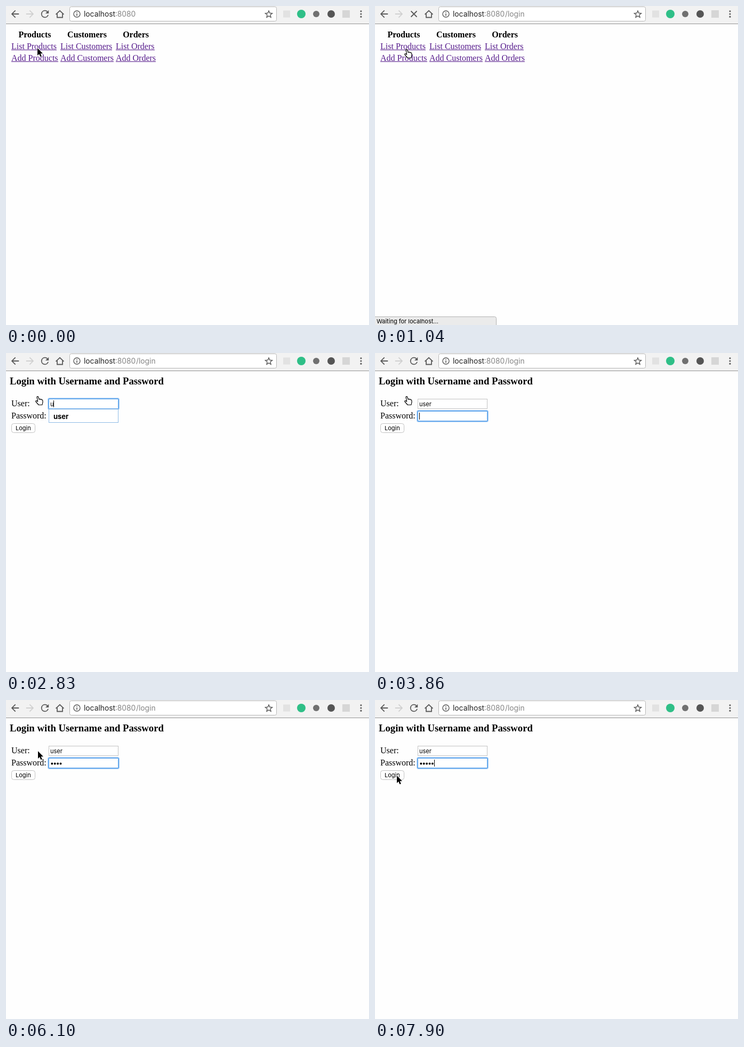
An HTML page for the animation above (8 s loop, 681 px wide and 599 px high).

```html
<!DOCTYPE html>
<html lang="en">
<head>
<meta charset="utf-8">
<title>Login demo</title>
<style>
  html, body { margin: 0; width: 100%; height: 100%; overflow: hidden; background: #fefefe; }
  svg { display: block; }
  .ui { font-family: Inter, sans-serif; font-size: 11px; }
  .url { font-size: 13.8px; }
  .page { font-family: "Liberation Serif", serif; font-size: 16px; }
  .th { font-weight: bold; text-anchor: middle; }
  .link { fill: #551a8b; }
  .icon { fill: #5a5a5a; }
  .line { fill: none; stroke: #5a5a5a; stroke-width: 1.8; }
</style>
</head>
<body>
<svg width="681" height="599" viewBox="0 0 681 599">
  <defs>
    <path id="arrow" d="M20 11H7.83l5.59-5.59L12 4l-8 8 8 8 1.41-1.41L7.83 13H20z"/>
  </defs>
  <rect width="681" height="599" fill="#fefefe"/>

  <g id="toolbar">
    <rect width="681" height="33" fill="#f2f2f2"/>
    <rect y="33" width="681" height="1" fill="#929292"/>
    <use href="#arrow" class="icon" transform="translate(6.2 4.2) scale(.9)"/>
    <use href="#arrow" fill="#d0d0d0" transform="translate(55.8 4.2) scale(-.9 .9)"/>
    <path id="reload" class="icon" transform="translate(62.2 4.2) scale(.9)" d="M17.65 6.35A7.96 7.96 0 0 0 12 4a8 8 0 1 0 7.73 10h-2.08A6 6 0 1 1 12 6c1.66 0 3.14.69 4.22 1.78L13 11h7V4z"/>
    <path id="stop" class="line" d="M67.5 9.5l11 11m0-11l-11 11"/>
    <path class="line" d="M93.5 15.8L101 8.8l7.500 7M96 14.500V21.500H106V14.500"/>
    <rect x="119.500" y="1.500" width="388" height="27" rx="3" fill="#fff" stroke="#b8b8b8"/>
    <circle cx="133" cy="15" r="6" class="line" style="stroke-width:1.4"/>
    <path class="icon" d="M132.200 11.500h1.600v1.600h-1.600zM132.200 14.200h1.600v4.300h-1.600z"/>
    <g class="ui url">
      <text x="146" y="20" fill="#222">localhost</text>
      <text x="204.800" y="20" fill="#858585">:8080</text>
      <text id="path" x="244" y="20" fill="#858585">/login</text>
    </g>
    <path class="line" style="stroke-width:1.400" d="M493 9l1.800 4.300 4.700.4-3.600 3 1.100 4.600-4-2.500-4 2.500 1.100-4.600-3.600-3 4.700-.4z"/>
    <rect id="ext" x="520" y="8.500" width="13" height="13"/>
    <circle cx="554" cy="15" r="8" fill="#2fbf87"/>
    <circle cx="582" cy="15" r="6" fill="#707070"/>
    <circle cx="610" cy="15" r="7" fill="#555"/>
    <rect x="631" y="8" width="14" height="14" fill="#d6d6d6"/>
    <g class="icon">
      <circle cx="666" cy="9.800" r="1.600"/><circle cx="666" cy="15" r="1.600"/><circle cx="666" cy="20.200" r="1.600"/>
    </g>
  </g>

  <g id="menu" class="page"></g>

  <g id="login">
    <text class="page" x="7" y="59" style="font-size:18.72px;font-weight:bold">Login with Username and Password</text>
    <text class="page" x="10" y="100">User:</text>
    <text class="page" x="10" y="123">Password:</text>
    <g fill="#fff" stroke="#c2c2c2">
      <rect x="80.500" y="86.500" width="130" height="18"/>
      <rect x="80.500" y="109.500" width="130" height="18"/>
      <rect x="10.500" y="132.500" width="44" height="17" rx="4"/>
    </g>
    <text class="ui" x="18" y="145">Login</text>
    <g id="ring" fill="none">
      <rect x="78.500" y="84.500" width="134" height="22" rx="2.500" stroke="#b9d8f8"/>
      <rect x="80" y="86" width="131" height="19" rx="1" stroke="#67a9ec" stroke-width="2"/>
    </g>
    <g id="hint">
      <rect x="80.500" y="105.500" width="130" height="25" fill="#fff" stroke="#8ebbe6"/>
      <text class="ui" x="89" y="124" style="font-size:13px;font-weight:bold">user</text>
    </g>
    <text id="user" class="ui" x="83" y="100"></text>
    <g id="dots"></g>
    <rect id="caret" width="1" height="13"/>
  </g>

  <g id="status">
    <path d="M-.5 583.500H224.500q3 0 3 3V600H-.5z" fill="#ebebeb" stroke="#b2b2b2"/>
    <text id="note" class="ui" x="3" y="596"></text>
  </g>

  <path id="hand" transform="translate(55 81)" fill="#fff" stroke="#000" stroke-width="1.200" stroke-linejoin="round"
    d="M3 1.600C3.600.2 5.400.4 5.800 1.800L7.200 6.200C7.600 5 9.300 5 9.700 6.400 10.400 5.400 11.800 5.800 12 7 12.800 6.400 13.700 7 13.800 8.200L14 11C14 13 13 14 12.800 16.500H6C5.400 14.500 2.600 13 1 10.400.2 9 1.600 8 3 9L4.600 10.200z"/>
  <path id="pointer" stroke="#fff" stroke-width="1.200" paint-order="stroke" d="M0 0V14L3.200 11 5.400 16.200 7.800 15.200 5.600 10.200H10z"/>
</svg>

<script>
const $ = id => document.getElementById(id);
const LOOP = 8000;

// Columns: name, left edge, center, width of each link
const columns = [
  ["Products", 10, 54, 85, 88],
  ["Customers", 102, 152, 97, 100],
  ["Orders", 206, 243.6, 73, 75]
];
$("menu").innerHTML = columns.map(([name, x, mid, listW, addW]) => {
  const link = (verb, y, w) =>
    `<text x="${x}" y="${y}">${verb} ${name}</text><rect x="${x}" y="${y + 1}" width="${w}" height="1"/>`;
  return `<text class="th" x="${mid}" y="59">${name}</text>` +
    `<g class="link">${link("List", 81, listW)}${link("Add", 103, addW)}</g>`;
}).join("");

$("dots").innerHTML = [0, 1, 2, 3, 4].map(i =>
  `<circle cx="${86.3 + i * 5.4}" cy="119.500" r="1.900"/>`).join("");
const dots = [...$("dots").children];

const userCaret = [83, 89, 95, 101, 105];
const passCaret = [83, 89, 94, 100, 105, 111];

const start = {
  page: "menu", path: false, busy: false, ext: "#e2e2e2", note: "", fade: 1,
  typed: 0, dots: 0, field: 0, hint: false, caret: true, at: [59, 79]
};

// Each step changes part of the state; at = null shows the hand
const steps = [
  [600, { at: null, note: "localhost:8080/showProducts" }],
  [770, { path: true, busy: true, ext: "#c2c2c6" }],
  [890, { note: "Waiting for localhost..." }],
  [1040, { ext: "#e2e2e2" }],
  [1630, { page: "login", busy: false }],
  [1780, { fade: .65 }],
  [1930, { fade: .3 }],
  [2080, { fade: 0, caret: false }],
  [2530, { caret: true }],
  [2830, { typed: 1, hint: true }],
  [2970, { typed: 2 }],
  [3420, { typed: 3 }],
  [3710, { typed: 4 }],
  [3860, { field: 1, hint: false }],
  [4460, { caret: false }],
  [4750, { dots: 1, caret: true }],
  [4900, { dots: 2 }],
  [5200, { dots: 3 }],
  [5350, { dots: 4 }],
  [5800, { caret: false }],
  [5950, { at: [60, 89] }],
  [6100, { at: [60, 96] }],
  [6400, { at: [57, 107], caret: true }],
  [6550, { at: [46, 135] }],
  [6700, { at: [39, 149] }],
  [6850, { at: [41, 142], caret: false }],
  [7300, { caret: true }],
  [7900, { dots: 5 }]
];

const show = (id, on) => { $(id).style.display = on ? "" : "none"; };

function render(s) {
  show("menu", s.page === "menu");
  show("login", s.page === "login");
  show("path", s.path);
  show("reload", !s.busy);
  show("stop", s.busy);
  $("ext").setAttribute("fill", s.ext);

  show("status", s.note && s.fade > 0);
  $("status").style.opacity = s.fade;
  $("note").textContent = s.note;

  $("ring").setAttribute("transform", `translate(0 ${s.field * 23})`);
  $("user").textContent = "user".slice(0, s.typed);
  dots.forEach((dot, i) => { dot.style.display = i < s.dots ? "" : "none"; });
  show("hint", s.hint);
  show("caret", s.caret);
  $("caret").setAttribute("x", s.field ? passCaret[s.dots] : userCaret[s.typed]);
  $("caret").setAttribute("y", 89 + s.field * 23);

  show("hand", !s.at);
  show("pointer", s.at);
  if (s.at) $("pointer").setAttribute("transform", `translate(${s.at})`);
}

let last = -1;
function tick() {
  const t = performance.now() % LOOP;
  const count = steps.filter(([time]) => time <= t).length;
  if (count !== last) {
    render(Object.assign({}, start, ...steps.slice(0, count).map(step => step[1])));
    last = count;
  }
  requestAnimationFrame(tick);
}
tick();
</script>
</body>
</html>
```
